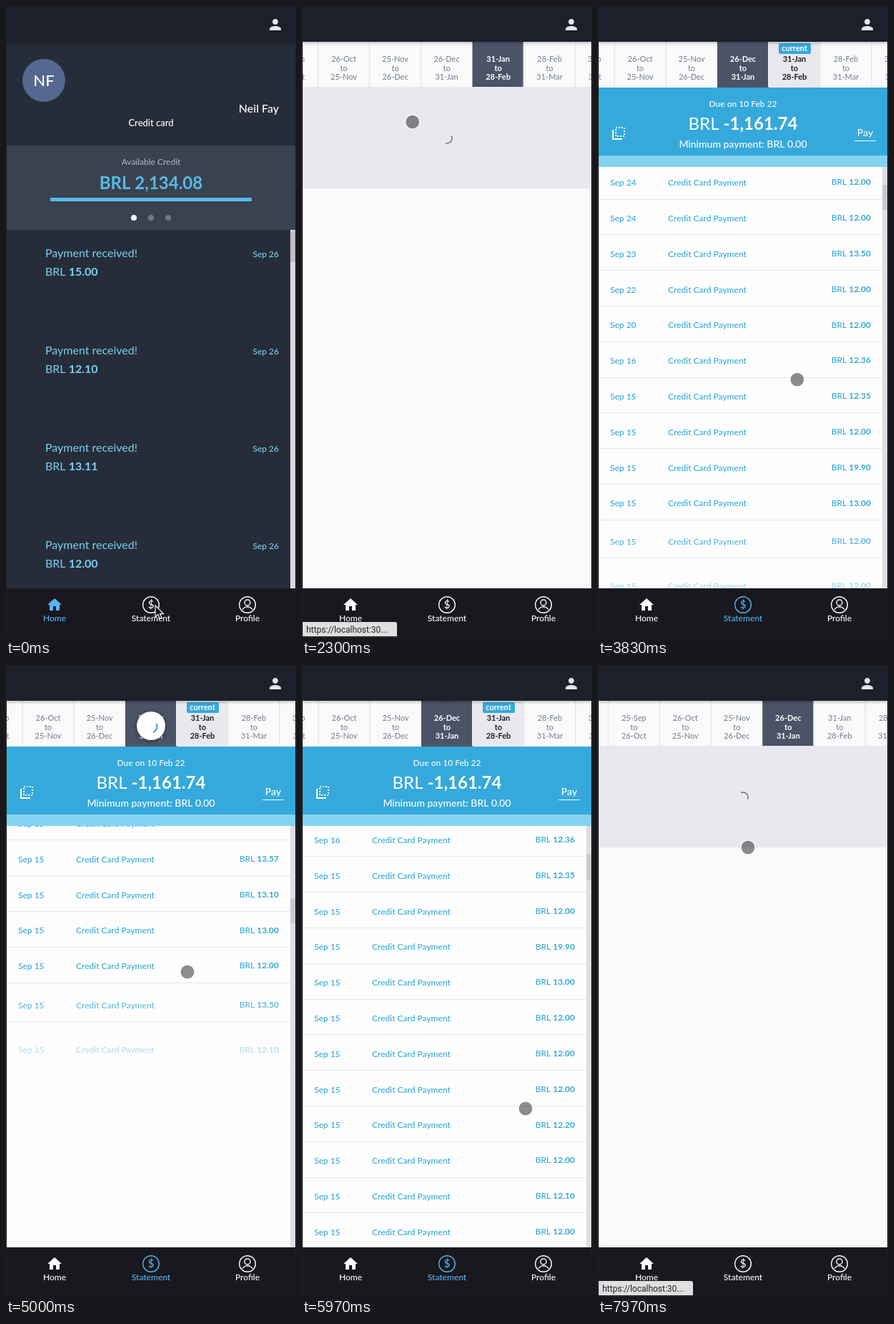
Recreate the animation shown at these times as an HTML page with a canvas. Size 406 px wide and 882 px high, loop 8000 ms.

```html
<!DOCTYPE html>
<html lang="en">
<head>
<meta charset="utf-8">
<title>Card statement</title>
<style>
html, body { margin: 0; width: 100%; height: 100%; overflow: hidden; background: #1a1a20; }
canvas { display: block; width: 406px; height: 882px; }
</style>
</head>
<body>
<canvas id="stage"></canvas>
<script>
const W = 406, H = 882, LOOP = 8000;
const canvas = document.getElementById('stage');
const ratio = window.devicePixelRatio || 1;
canvas.width = W * ratio;
canvas.height = H * ratio;
const c = canvas.getContext('2d');
c.scale(ratio, ratio);

const BLUE = '#35a9db', SKY = '#7bd0f2', PAPER = '#fafafa', NAVY = '#262d38';
const HOME_ICON = new Path2D('M10 20v-6h4v6h5v-8h3L12 3 2 12h3v8z');
const PERSON_ICON = new Path2D('M12 12c2.21 0 4-1.79 4-4s-1.79-4-4-4-4 1.79-4 4 1.79 4 4 4zm0 2c-2.67 0-8 1.34-8 4v2h16v-2c0-2.66-5.33-4-8-4z');
const ARROW = new Path2D('M0 0V16L3.8 12.5 6.4 18.4 9 17.3 6.5 11.6H11.5Z');

const PERIODS = ['25-Sep', '26-Oct', '25-Nov', '26-Dec', '31-Jan', '28-Feb', '31-Mar', '30-Apr', '31-May'];
const CURRENT = 4, CELL = 72;
const DATES = ['Dec 15', 'Dec 15', 'Nov 25', 'Oct 15', 'Sep 30', 'Sep 29', 'Sep 24', 'Sep 24',
  'Sep 24', 'Sep 24', 'Sep 23', 'Sep 22', 'Sep 20', 'Sep 16'];
const AMOUNTS = { 0: '100.00', 1: '100.00', 2: '3,354.70', 4: '44.00', 5: '250.00', 10: '13.50',
  13: '12.36', 14: '12.35', 16: '19.90', 17: '13.00', 21: '12.20', 23: '12.10', 27: '12.50',
  31: '13.00', 34: '13.57', 35: '13.10', 36: '13.00', 38: '13.50', 39: '12.10' };
const ROW = 49.8, ROW_COUNT = 200;

// Moments at which the screen changes
const OPEN = 90, EMPTY = 900, PICK = 1800, LIST = 2640, PICK_AGAIN = 7560;

// Tracks: [time, value, ...]
const STRIP = [[PICK, -85], [PICK + 525, -13], [PICK_AGAIN, -13], [PICK_AGAIN + 525, 59]];
const SCROLL = [[3350, 0], [3700, 350], [4000, 480], [4300, 1000], [4700, 1580], [4900, 1690],
  [5000, 1673], [5300, 1350], [5600, 950], [5970, 654], [6150, 350], [6450, 0]];
const REFRESH = [[4780, 22], [5000, 85], [5200, 98], [5800, 98], [5970, 29], [6040, 22]];
const POINTER = [[250, 209, 838], [870, 212, 90], [1080, 216, 40], [1330, 221, 129], [1700, 131, 86],
  [2050, 131, 86], [3070, 287, 587], [3300, 288, 610], [3600, 262, 310], [3950, 285, 600],
  [4250, 258, 300], [4500, 280, 590], [4800, 252, 340], [5000, 254, 429], [5250, 280, 590],
  [5550, 285, 340], [5970, 313, 620], [6250, 300, 390], [6570, 281, 338], [7350, 131, 86],
  [7600, 131, 86], [7970, 210, 255], [8000, 212, 262]];

function track(keys, t) {
  const next = keys.findIndex(k => k[0] > t);
  if (next === 0) return keys[0].slice(1);
  if (next < 0) return keys[keys.length - 1].slice(1);
  const a = keys[next - 1], b = keys[next];
  const u = (t - a[0]) / (b[0] - a[0]), e = u * u * (3 - 2 * u);
  return a.slice(1).map((v, i) => v + (b[i + 1] - v) * e);
}

function rect(x, y, w, h, color) {
  c.fillStyle = color;
  c.fillRect(x, y, w, h);
}

function arc(x, y, r, color, { from = 0, to = 7, line = 0 } = {}) {
  c.beginPath();
  c.arc(x, y, r, from, Math.min(to, from + 2 * Math.PI));
  c.fillStyle = c.strokeStyle = color;
  c.lineWidth = line;
  if (line) c.stroke(); else c.fill();
}

function icon(path, x, y, color) {
  c.save();
  c.translate(x, y);
  c.fillStyle = color;
  c.fill(path);
  c.restore();
}

// y is the middle of the capitals
function text(str, x, y, size, color, { weight = 500, align = 'left', family = 'Lato' } = {}) {
  c.font = `${weight} ${size}px ${family}, sans-serif`;
  c.textAlign = align;
  c.fillStyle = color;
  c.fillText(str, x, y + size * 0.34);
  return c.measureText(str).width;
}

const centered = (str, x, y, size, color, weight = 500) =>
  text(str, x, y, size, color, { weight, align: 'center' });

// Currency in regular, number in bold; anchor 0 = left, 0.5 = centre, 1 = right
function money(value, x, y, size, color, anchor, weight = 500) {
  c.font = `${weight} ${size}px Lato, sans-serif`;
  const prefix = c.measureText('BRL ').width;
  c.font = `700 ${size}px Lato, sans-serif`;
  const left = x - (prefix + c.measureText(value).width) * anchor;
  text('BRL ', left, y, size, color, { weight });
  text(value, left + prefix, y, size, color, { weight: 700 });
}

function clip(x, y, w, h, draw) {
  c.save();
  c.beginPath();
  c.rect(x, y, w, h);
  c.clip();
  draw();
  c.restore();
}

function drawHome() {
  rect(0, 50, W, 764, NAVY);
  arc(53, 104, 30, '#546890');
  centered('NF', 53, 105, 22, '#fff');
  text('Neil Fay', 382, 143.5, 16, '#fff', { align: 'right' });
  centered('Credit card', 203, 163.5, 13, '#fff');
  rect(0, 195, W, 118, '#39424f');
  centered('Available Credit', 203, 218, 12, '#b5bbc6', 400);
  centered('BRL 2,134.08', 203, 247.5, 24, '#57bbe8', 700);
  rect(62, 268, 282, 5, '#57bbe8');
  ['#fff', '#6f7781', '#6f7781'].forEach((color, i) => arc(179 + 24 * i, 296, 4, color));
  clip(0, 313, W, 501, () => ['15.00', '12.10', '13.11', '12.00'].forEach((value, i) => {
    const y = 345.5 + 136 * i;
    text('Payment received!', 55, y, 16, SKY, { weight: 400 });
    text('Sep 26', 382, y + 1.5, 12, SKY, { align: 'right' });
    money(value, 55, y + 26, 16, SKY, 0, 400);
  }));
  rect(398, 313, 8, 501, '#d8d8df');
  rect(398, 315, 8, 43, '#bfc0c7');
}

function drawStrip(t, selected, loaded) {
  rect(0, 50, W, 64, PAPER);
  const [first] = track(STRIP, t);
  for (let i = -1; i < PERIODS.length - 1; i++) {
    const x = first + CELL * i, left = x - CELL / 2;
    const active = i === selected, current = loaded && i === CURRENT;
    rect(left - 1, 50, 2, 63, '#ebebee');
    if (active) rect(left, 50, CELL, 64, '#4b5466');
    else if (current) rect(left, 50, CELL, 64, '#e8e8ed');
    const color = active ? '#fff' : current ? '#1d1f27' : '#7b8499';
    const weight = active || current ? 700 : 500;
    [PERIODS[i] || '25-Aug', 'to', PERIODS[i + 1]].forEach((line, n) =>
      centered(line, x, 74.5 + 12.5 * n, 11, color, weight));
    if (current) {
      c.beginPath();
      c.roundRect(x - 22, 52, 45, 15, 2);
      c.fillStyle = BLUE;
      c.fill();
      centered('current', x, 59.5, 11, '#fff', 700);
    }
  }
}

function drawSummary(due, value, note, main, edge) {
  rect(0, 114, W, 95, main);
  rect(0, 209, W, 16, edge);
  centered('Due on ' + due, 203, 137, 12, '#fff');
  money(value, 203, 164.5, 24, '#fff', 0.5, 400);
  centered(note, 203, 193.5, 14, '#fff');
  centered('Pay', 374, 177, 14, '#fff');
  rect(359, 188, 30, 1, '#fff');
  c.strokeStyle = '#fff';
  c.lineWidth = 2;
  c.beginPath();
  c.moveTo(21, 173);
  c.lineTo(21, 186);
  c.lineTo(34, 186);
  c.stroke();
  c.setLineDash([2, 2]);
  c.strokeRect(25, 170, 12, 12);
  c.setLineDash([]);
}

function drawLoading(t) {
  rect(0, 113, W, 142, '#e8e8ee');
  const from = -2 + (t - 7970) * 0.0075;
  arc(203, 185, 7, '#666a72', { from, to: from + 2.4, line: 1.3 });
}

function drawEmpty() {
  drawSummary('10 Mar 22', '0.00', 'Transactions', '#98a1b2', '#b6bccb');
  rect(0, 225, W, 93, '#fff');
  centered('No transactions were found for the selected date.', 203, 274.5, 14, '#98a1b1');
}

function drawRow(k, y) {
  const color = k < 2 ? '#1d2029' : BLUE;
  text(DATES[k] || 'Sep 15', 17, y + 26.5, 12, k < 2 ? '#7b8499' : BLUE);
  text(k < 2 ? 'PAGAMENTO WI' : 'Credit Card Payment', 98, y + 26.5, 12, color);
  money(AMOUNTS[k] || '12.00', 382, y + 25.7, 12, color, 1);
  rect(0, Math.round(y + 49), 398, 1, '#e6e6ea');
}

function drawList(t) {
  rect(0, 225, W, 589, '#fdfdfd');
  const [scroll] = track(SCROLL, t);
  clip(0, 225, 398, 589, () => {
    // Rows rise and fade in one after another
    for (let k = Math.floor(scroll / ROW); k < ROW_COUNT; k++) {
      const wait = Math.max(0, 1 - (t - 2651 - 58.9 * k) / 177);
      const y = 225 + ROW * k - scroll;
      if (wait >= 1 || y > 814) break;
      c.globalAlpha = (1 - wait * wait) ** 1.5;
      drawRow(k, y + 36 * wait * wait);
    }
  });
  rect(398, 225, 8, 589, '#dedee5');
  rect(398, 226 + scroll / 16.7, 8, 35, '#c9c9d0');
  drawSummary('10 Feb 22', '-1,161.74', 'Minimum payment: BRL 0.00', BLUE, '#84d4f1');

  const [y] = track(REFRESH, t);
  if (y > 22) {
    c.save();
    c.shadowColor = 'rgba(0,0,0,.5)';
    c.shadowBlur = 5;
    c.shadowOffsetY = 1;
    arc(203, y, 20, '#fff');
    c.restore();
    const from = -0.5 + (t - 5000) * 0.0075;
    arc(203, y + 1, 8.5, '#5f9fd6', { from, to: from + 1.7, line: 2.4 });
  }
}

function drawTopBar() {
  c.save();
  c.shadowColor = 'rgba(0,0,0,.35)';
  c.shadowBlur = 5;
  c.shadowOffsetY = 1;
  rect(0, 0, W, 50, '#1c202b');
  c.restore();
  icon(PERSON_ICON, 365, 14, '#e3e6ee');
}

function drawNav(active) {
  rect(0, 814, W, 68, '#18181e');
  const tint = name => name === active ? '#58b4f5' : '#fff';
  icon(HOME_ICON, 56, 825, tint('Home'));
  arc(203, 837, 11.3, tint('Statement'), { line: 1.4 });
  centered('$', 203, 837, 15, tint('Statement'));
  arc(338, 837, 11.3, '#fff', { line: 1.4 });
  arc(338, 834, 4, '#fff', { line: 1.4 });
  arc(338, 848, 8.3, '#fff', { from: Math.PI * 1.18, to: Math.PI * 1.82, line: 1.4 });
  ['Home', 'Statement', 'Profile'].forEach((name, i) =>
    centered(name, 68 + 135 * i, 856, 12, tint(name)));
}

function drawStatus() {
  c.beginPath();
  c.roundRect(0, 861, 133, 21, [0, 3, 0, 0]);
  c.fillStyle = '#dfdfe1';
  c.fill();
  text('https://localhost:30...', 6, 871.5, 12, '#222', { weight: 400, family: 'Roboto' });
}

function drawPointer(t) {
  const [x, y] = track(POINTER, t);
  if (t < 250) {
    icon(ARROW, x, y, '#111');
    c.save();
    c.translate(x, y);
    c.strokeStyle = '#fff';
    c.lineWidth = 1.2;
    c.stroke(ARROW);
    c.restore();
    return;
  }
  arc(x, y, 9.5, 'rgba(40,40,40,.53)');
  arc(x, y, 10.2, 'rgba(255,255,255,.6)', { line: 1.6 });
}

function draw(t) {
  rect(0, 0, W, H, PAPER);
  const home = t < OPEN;
  const empty = t >= EMPTY && t < PICK;
  const list = t >= LIST && t < PICK_AGAIN;
  if (home) drawHome();
  else {
    drawStrip(t, t < LIST ? 4 : 3, empty || list);
    if (empty) drawEmpty();
    else if (list) drawList(t);
    else drawLoading(t);
  }
  drawTopBar();
  drawNav(home ? 'Home' : empty || list ? 'Statement' : '');
  if ((t > 60 && t < 800) || (t > 1750 && t < 2400) || t >= PICK_AGAIN) drawStatus();
  drawPointer(t);
  c.strokeStyle = '#202124';
  c.lineWidth = 1;
  c.strokeRect(0.5, 0.5, W - 1, H - 1);
}

const start = performance.now();
function tick() {
  draw((performance.now() - start) % LOOP);
  requestAnimationFrame(tick);
}
tick();
</script>
</body>
</html>
```
